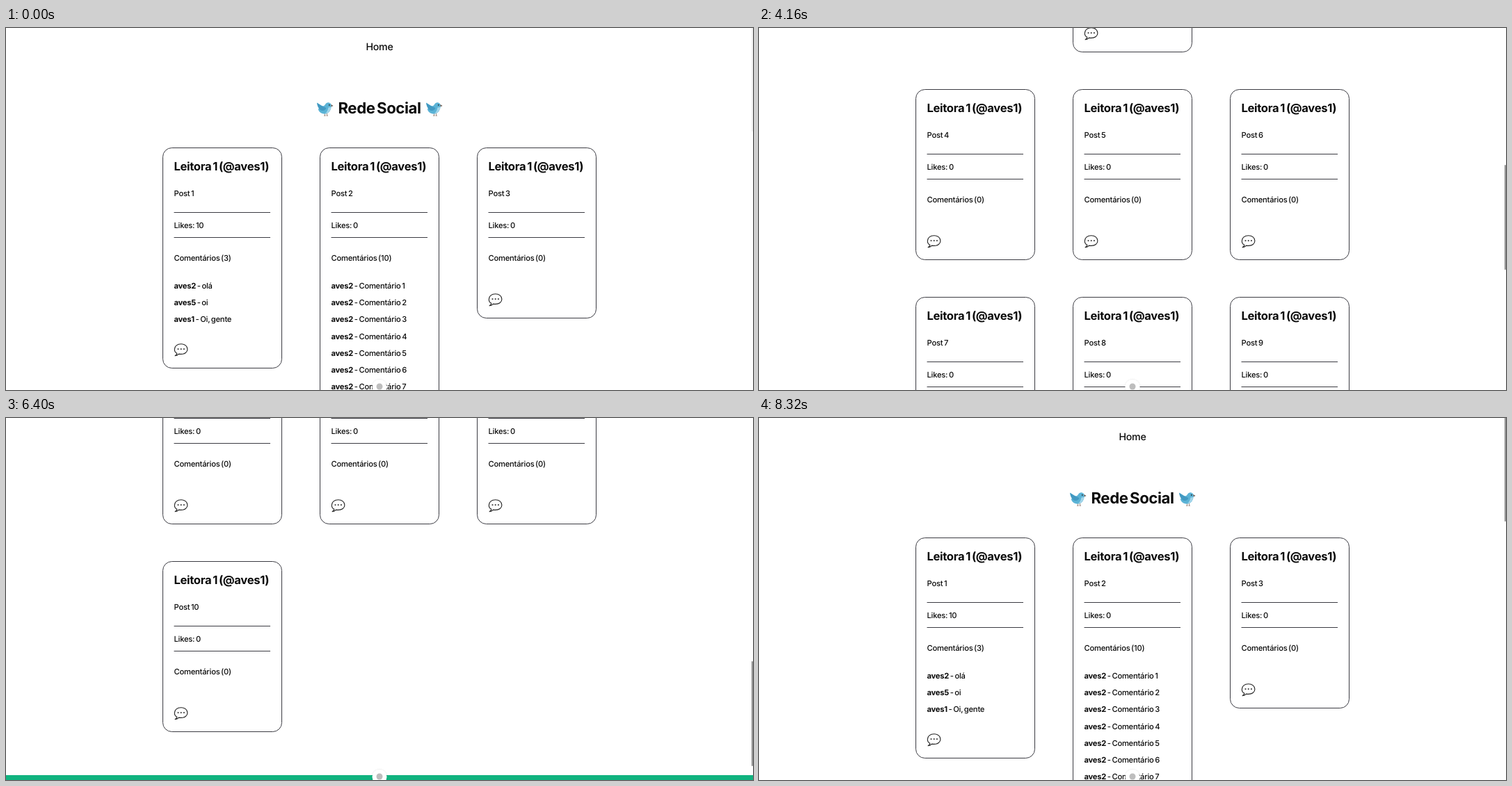
These frames come from a looping animation (1074 px wide and 521 px high, 8.4 s). An HTML page:

```html
<!DOCTYPE html>
<html lang="pt-BR">
<head>
<meta charset="utf-8">
<title>Rede Social</title>
<style>
  html, body { margin: 0; width: 100%; height: 100%; overflow: hidden; background: #fff; }
  svg { display: block; width: 100vw; height: 100vh; }
  text {
    font: 450 11.2px Inter, "Open Sans", sans-serif;
    letter-spacing: -.02em;
    word-spacing: -.1em;
    fill: #0b0b0b;
    text-rendering: geometricPrecision;
  }
  .name { font-size: 16.6px; font-weight: 700; }
  .title { font-size: 22.2px; font-weight: 700; }
  .nav { font-size: 14.2px; font-weight: 550; }
  .who { font-weight: 700; }
  .mid { text-anchor: middle; }
  .line { fill: none; stroke: #3b3b42; stroke-width: 1; }
</style>
</head>
<body>
<svg viewBox="0 0 1074 521">
  <defs>
    <g id="bird">
      <path d="M11.5 18.5V22M14.5 18.5V22M10 22.2H12.6M13.6 22.2H16" stroke="#8a7266" stroke-width=".8" fill="none"/>
      <path d="M0 3.6L6.4 7.6C8.8 8.8 10.6 8.2 11.8 6.2C13 3.8 15.2 2.8 17.6 3.4C19.8 4 21 5.8 20.8 8.2C20.4 15 16.6 19.4 11 19.6C6.4 19.6 3 16.8 1.8 13L3 11.4Q.4 8 0 3.6Z" fill="#5bb3d6"/>
      <path d="M20.4 9.8C19.8 15 16.6 18.8 11.6 19.5C14.6 17 16 13.8 16.4 10.6Z" fill="#a4d6ea"/>
      <path d="M.2 3.8L7 8.2C10 9.6 12.2 10 13.4 11.4C12.2 14.6 8.4 16 4.8 14C2.2 11.6.6 8 .2 3.8Z" fill="#4299c2"/>
      <path d="M20.4 6L23.6 8L20.6 9.2Z" fill="#6b5a50"/>
      <circle cx="17.8" cy="6.8" r=".9" fill="#222"/>
    </g>
    <g id="bubble">
      <path d="M-5.6 5.3C-8 4-9.2 2-9.2-.6C-9.2-5.2-5.2-8.2.2-8.2C5.6-8.2 9.4-5.2 9.4-.7C9.4 3.8 5.4 6.4.2 6.4C-1 6.4-2 6.3-3 6.1C-4.4 7.6-6.2 8.5-8.4 8.7C-6.8 7.7-5.8 6.6-5.6 5.3Z" fill="#fff" stroke="#222" stroke-width="1.1" stroke-linejoin="round"/>
      <g fill="#444"><circle cx="-4" cy="-.9" r="1.1"/><circle cx=".2" cy="-.9" r="1.1"/><circle cx="4.4" cy="-.9" r="1.1"/></g>
    </g>
    <filter id="soft" x="-50%" y="-50%" width="200%" height="200%">
      <feDropShadow dx="0" dy="0" stdDeviation="1.2" flood-opacity=".16"/>
    </filter>
  </defs>
  <rect width="1074" height="521" fill="#fff"/>
  <g id="page">
    <text class="nav mid" x="537" y="32">Home</text>
    <use href="#bird" x="447" y="104"/>
    <text class="title mid" x="537" y="123">Rede Social</text>
    <use href="#bird" x="604" y="104"/>
    <g id="cards"></g>
    <rect y="1619" width="1074" height="54" fill="#10b37f"/>
  </g>
  <circle cx="537" cy="516.5" r="10.5" fill="#fff" filter="url(#soft)"/>
  <circle cx="537" cy="516" r="4.5" fill="#bdbdbd"/>
  <rect id="thumb" x="1072" width="1.7" height="151" rx=".8" fill="#808080"/>
</svg>
<script>
const $ = id => document.getElementById(id);
const LOOP = 8400, STEP = 80, PITCH = 24.2;
const rows = [172.5, 713.5, 1012.5, 1311.5];

const comments = {
  1: [['aves2', 'olá'], ['aves5', 'oi'], ['aves1', 'Oi, gente']],
  2: Array.from({ length: 10 }, (_, i) => ['aves2', `Comentário ${i + 1}`])
};

function card(id) {
  const list = comments[id] || [];
  const x = 225.5 + (id - 1) % 3 * 226;
  const y = rows[Math.floor((id - 1) / 3)];
  const extra = Math.floor(list.length * PITCH);
  const text = (dy, body, cls = '') => `<text class="${cls}" x="16" y="${dy}">${body}</text>`;
  return `<g transform="translate(${x} ${y})">
    <rect class="line" width="171" height="${245 + extra}" rx="13"/>
    ${text(32.5, 'Leitora 1 (@aves1)', 'name')}
    ${text(69, `Post ${id}`)}
    <path class="line" d="M16 93H154.5M16 129H154.5"/>
    ${text(115.5, `Likes: ${id === 1 ? 10 : 0}`)}
    ${text(162.3, `Comentários (${list.length})`)}
    ${list.map(([who, say], i) =>
      text(202.5 + i * PITCH, `<tspan class="who">${who}</tspan> - ${say}`)).join('')}
    <use href="#bubble" x="26" y="${218.5 + extra}"/>
  </g>`;
}
$('cards').innerHTML = Array.from({ length: 10 }, (_, i) => card(i + 1)).join('');

// Scroll keys: [ms, px]
const keys = [
  [0, 0], [2240, 0], [2320, 56], [3040, 351], [3280, 415],
  [3840, 415], [3920, 462], [4880, 1075], [5120, 1130], [5360, 1150], [5520, 1152],
  [6320, 1152], [6400, 1105], [7040, 721], [8080, 26], [8160, 8], [8320, 0], [8400, 0]
];
const slope = i => (keys[i + 1][1] - keys[i][1]) / (keys[i + 1][0] - keys[i][0]);

// Harmonic mean tangents keep the curve free of overshoot.
function tangent(i) {
  if (i === 0 || i === keys.length - 1) return 0;
  const a = slope(i - 1), b = slope(i);
  return a * b <= 0 ? 0 : 2 * a * b / (a + b);
}

function scrollAt(t) {
  let i = 0;
  while (i < keys.length - 2 && t >= keys[i + 1][0]) i++;
  const [t0, p0] = keys[i], [t1, p1] = keys[i + 1];
  const d = t1 - t0, u = (t - t0) / d, v = 1 - u;
  return v * v * (1 + 2 * u) * p0 + u * u * (3 - 2 * u) * p1
    + d * u * v * (v * tangent(i) - u * tangent(i + 1));
}

function thumbAlpha(t) {
  if (t < 2320) return Math.max(0, .14 * (1 - t / 320));
  return t < 2400 ? .4 : 1;
}

function draw(ms) {
  const t = Math.floor(ms % LOOP / STEP) * STEP;
  const y = Math.round(scrollAt(t));
  $('page').setAttribute('transform', `translate(0 ${-y})`);
  $('thumb').setAttribute('y', -2 + y * .3185);
  $('thumb').setAttribute('opacity', thumbAlpha(t));
}

const start = performance.now();
function tick() {
  draw(performance.now() - start);
  requestAnimationFrame(tick);
}
tick();
</script>
</body>
</html>
```
